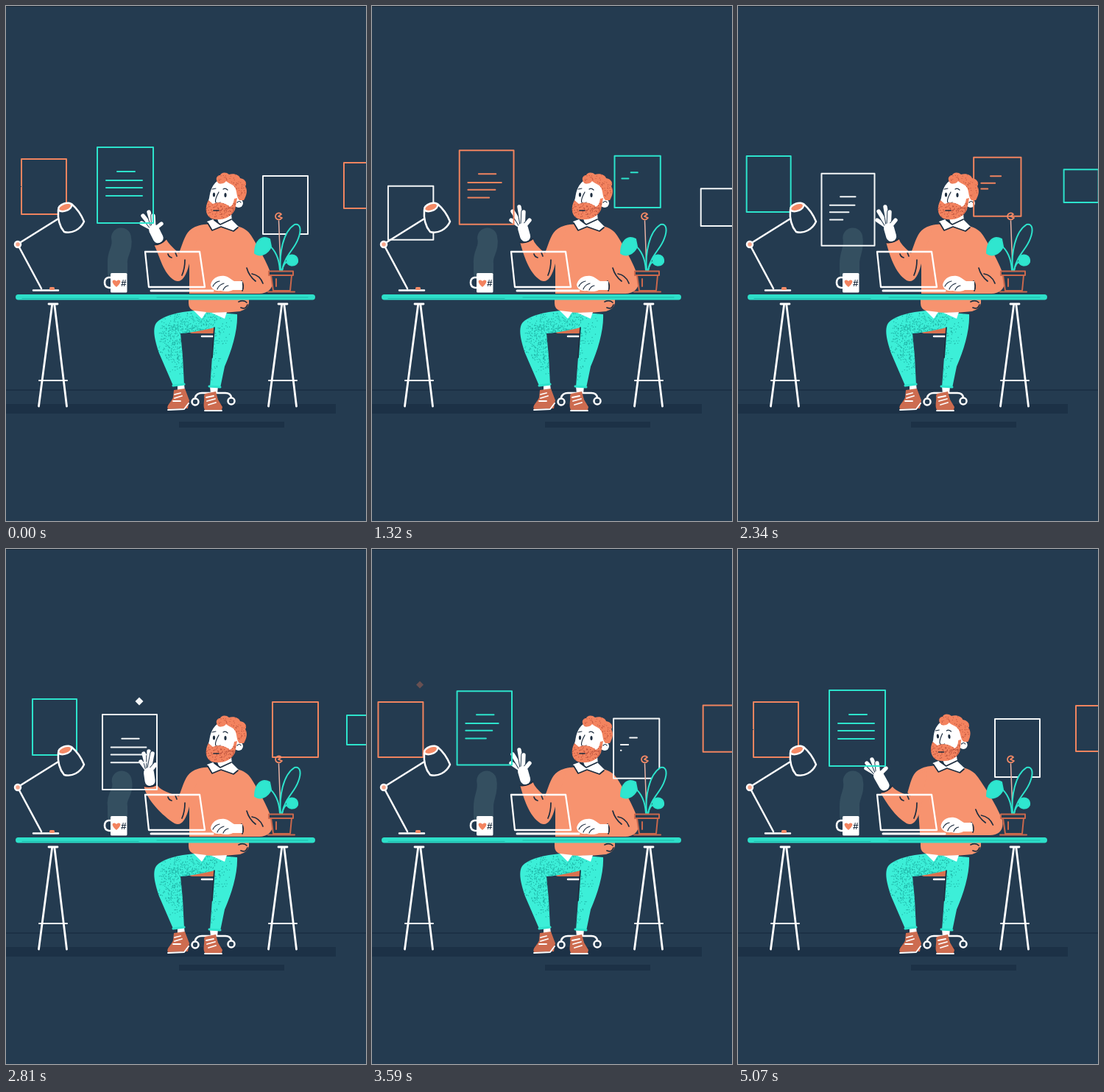
These frames come from a looping animation (489 by 700 pixels, 5150 ms). An HTML page:

```html
<!DOCTYPE html>
<html lang="en">
<head>
<meta charset="utf-8">
<title>Man at a desk swiping panels</title>
<style>
  html, body { margin: 0; width: 100%; height: 100%; overflow: hidden; background: #243b50; }
  svg { display: block; width: 100vw; height: 100vh; }
  .line { fill: none; stroke-linecap: round; stroke-linejoin: round; }
  .white { stroke: #fff; }
  .ink { stroke: #1d2d3f; stroke-width: 1.7; }
  .thin { stroke-width: 1.2; }
  .teal { stroke: #2de3cc; }
  .orange { stroke: #f58a66; }
  .clay { stroke: #c9684d; }
  .skin { fill: #fff; }
  .wool { fill: #f7936f; }
  .hair { fill: #f3835f; }
  .cloth { fill: #3cefd8; }
  .shoe { fill: #cd6c50; }
  .night { fill: #243b50; }
  .shade { fill: #1c3146; }
  .dots { fill: none; stroke-linecap: round; }
  text { font: italic bold 13px "Liberation Sans", sans-serif; fill: #1d2d3f; }
</style>
</head>
<body>
<svg viewBox="0 0 489 700" preserveAspectRatio="none">
  <defs>
    <filter id="rough" filterUnits="userSpaceOnUse" x="0" y="0" width="489" height="700" color-interpolation-filters="sRGB">
      <feTurbulence type="fractalNoise" baseFrequency=".12" seed="4"/>
      <feDisplacementMap in="SourceGraphic" scale="1.5" xChannelSelector="R" yChannelSelector="G"/>
    </filter>
    <path id="hairShape" d="M289 241C284 238 285 230 291 230C292 226 299 225 303 229C310 227 317 230 318 234C325 235 328 241 325 245C329 251 326 259 323 264L317 264C313 260 314 254 312 249C310 242 303 242 299 238C296 242 292 242 289 241Z"/>
    <path id="beardShape" d="M275 264C270 273 270 286 281 289.500C295 292 306 287 311 277L314 261L310 262C309 268 308 271 304 273C298 267 287 266 281 269Z"/>
    <path id="legs" d="M256 414C235 416 212 421 204 431C198 440 203 457 208 472L227 516L242 515L240 476L237 445C250 444 268 441 283 437L277 518L291 519L297 490C307 467 315 440 314 419Z"/>
    <clipPath id="hairClip"><use href="#hairShape"/></clipPath>
    <clipPath id="beardClip"><use href="#beardShape"/></clipPath>
    <clipPath id="legClip"><use href="#legs"/></clipPath>
    <g id="trestle" class="line white" stroke-width="2.800">
      <path d="M58 405H70M62.500 407L44.500 544M66 407L82.500 544"/>
      <path d="M45 509H83" stroke-width="2"/>
    </g>
  </defs>

  <rect class="night" width="489" height="700"/>
  <rect width="489" height="1" fill="#182838"/>

  <g filter="url(#rough)">
    <rect class="shade" y="521" width="489" height="2"/>
    <rect class="shade" x="-5" y="541" width="453" height="13"/>
    <rect class="shade" x="235" y="565" width="143" height="8"/>
  </g>

  <!-- chair -->
  <g class="line white" stroke-width="2.500">
    <path d="M257 532Q259 526 266 526H298Q305 526 306 532"/>
    <circle cx="257" cy="538" r="4.500"/><circle cx="306" cy="537" r="4.500"/>
    <path d="M266 449H281"/>
  </g>
  <rect x="249" y="436" width="36" height="9" rx="4" fill="#d9714f"/>

  <!-- legs and shoes -->
  <path class="skin" d="M233 514H242L243 523H233ZM277 517H288L287 527H278Z"/>
  <use href="#legs" class="cloth"/>
  <path id="legDots" class="dots" clip-path="url(#legClip)" stroke="#1fb3a6" stroke-width="1.300"/>
  <path class="line teal" stroke-width="3" d="M227 516L242 514M276 517L291 518"/>
  <path class="line ink" d="M283 437L280 478"/>
  <path class="shoe" d="M228 522L243 520L249 536L247 547L220 548C217 543 225 538 227 532Z"/>
  <path class="shoe" d="M270 527L285 524L288 535L294 545L293 549H270C267 543 270 537 269 530Z"/>
  <path class="line white" stroke-width="1.800" d="M220 549L242 548L248 540M270 550H293M229 528L237 526M229 533L239 530M227 537L237 537M272 532L282 530M273 537L284 534M275 542L285 539"/>
  <path class="wool" d="M248 396H330V404Q328 412 318 415Q285 419 258 415Q248 413 248 404Z"/>
  <path class="skin" d="M255 414L272 416L266 425ZM279 417L300 416L297 425Z"/>
  <path class="line ink" d="M316 402Q323 399 327 403M319 410Q326 413 328 406"/>

  <!-- steam -->
  <path id="steam" class="line" stroke="#344f60" stroke-width="27"/>

  <g id="torso">
    <path class="wool" d="M252 303C262 296 276 296 291 297C309 297 325 299 333 312C341 325 355 348 362 370C364 384 356 391 344 391H249V350L236 333C241 320 244 308 252 303Z"/>
    <path class="line ink" d="M327 356Q330 367 339 374M334 364Q345 366 349 377M320 374Q324 380 321 387"/>
    <path class="skin" d="M278 379C280 370 288 366 297 367C303 368 306 372 310 374L321 374V386L308 386C303 389 296 388 291 387C285 388 279 385 278 379Z"/>
    <path class="line ink thin" d="M281 381Q284 375 290 374M287 385Q289 379 296 377M295 386Q297 381 302 380"/>
    <path class="skin" d="M285 283L306 281L307 294L290 298Z"/>
    <path class="skin" d="M273 293L281 290L291 297L306 290L316 300L309 306L293 300L280 305Z"/>
    <path class="line ink" d="M283 291L291 297L306 290M274 295L280 305L292 300L309 306L315 301"/>
    <g>
      <path class="skin" d="M287 238C279 244 277 254 276 261L273 271L281 281L308 276L317 260L313 244L298 236Z"/>
      <circle class="skin" cx="316" cy="268" r="6"/>
      <path class="line ink thin" d="M314 267Q317 264 319 267M280 249L285 248M295 249Q298 247 301 250M289 253Q283 264 285 267Q288 269 291 267"/>
      <ellipse cx="282.500" cy="256.500" rx="1.600" ry="3" fill="#1d2d3f"/>
      <ellipse cx="298" cy="257" rx="1.600" ry="3" fill="#1d2d3f"/>
      <use href="#hairShape" class="hair"/><use href="#beardShape" class="hair"/>
      <path id="hairDots" class="dots" clip-path="url(#hairClip)" stroke="#c45941" stroke-width="1.200"/>
      <path id="beardDots" class="dots" clip-path="url(#beardClip)" stroke="#b9523d" stroke-width="1.300"/>
      <path class="line ink" d="M282 278L289 278"/>
    </g>
  </g>
  <path id="sleeve" class="wool"/>
  <path class="line ink" d="M220 337Q221 341 225 342M230 335L232 340M243 345Q243 357 239 366"/>
  <g id="hand"></g>

  <!-- desk -->
  <use href="#trestle"/><use href="#trestle" x="312"/>
  <rect x="13" y="392" width="407" height="7.500" rx="3.700" fill="#2ddfc9"/>
  <path class="line" stroke="#1fb9ac" stroke-width="1.200" d="M22 397.500H180M205 396H410"/>

  <g id="panels" class="line" filter="url(#rough)" stroke-width="2"></g>
  <g id="gems"></g>

  <!-- laptop -->
  <g class="line white" stroke-width="2.300">
    <path d="M189 334H263L270 382H194Z"/><path d="M197 387H281" stroke-width="3"/>
  </g>

  <!-- lamp -->
  <g class="line white" stroke-width="2.500">
    <path d="M48 384L18 328M20 321L76 286M37 386.500H71"/>
    <circle cx="16" cy="324" r="4" fill="#f7a58a"/>
    <path style="fill:#243b50" d="M71 277C70 289 73 300 79 307C89 310 101 304 106 293C102 283 96 275 89 269"/>
    <ellipse cx="80" cy="273.500" rx="9.500" ry="5" transform="rotate(-20 80 273)" style="fill:#f58a66"/>
  </g>
  <rect x="59" y="382" width="7" height="4" rx="1.500" fill="#f58a66"/>

  <!-- mug -->
  <path class="line white" stroke-width="2.600" d="M142 369H139Q134 370 134 376T140 383H143"/>
  <rect class="skin" x="142" y="363" width="22.500" height="26.500" rx="1.500"/>
  <path fill="#f3835f" d="M150 382C141 375 145 370 150 374C155 370 159 375 150 382Z"/>
  <text x="156" y="381">#</text>

  <!-- plant -->
  <path class="line" stroke="#e9b3a5" stroke-width="1.500" d="M370.500 292L373 358"/>
  <path class="line orange" stroke-width="1.800" d="M374 283A4.500 4.500 0 1 0 374.500 288M374 283L370 286L375 288"/>
  <g class="line teal" stroke-width="2">
    <path style="fill:#243b50" d="M373 359C371 337 376 307 392 297C401 295 401 306 397 316C392 331 379 338 375 359"/>
    <path d="M357 325C366 332 371 343 372 359M387 345C379 347 376 352 375 360"/>
    <path style="fill:#2fe6cf" d="M358 317C347 311 338 320 338 336C344 341 355 338 360 327Z"/>
    <path style="fill:#2fe6cf" d="M382 341C388 336 397 339 396 348C393 354 385 354 382 349Z"/>
  </g>
  <g class="line clay" stroke-width="2">
    <path style="fill:#243b50" d="M360 366H388L386 387H363Z"/>
    <path style="fill:#243b50" d="M357 360.500H390V366H357Z"/>
    <path d="M356 388.500H392M367 371V381"/>
  </g>
</svg>

<script>
const LOOP = 5150, STEPS = 66, STEP = LOOP / STEPS;
const TEAL = '#2de3cc', ORANGE = '#f0845f', WHITE = '#f4f7f8';
const NS = 'http://www.w3.org/2000/svg';
const $ = id => document.getElementById(id);
const clamp = v => Math.max(0, Math.min(1, v));
const lerp = (a, b, p) => a + (b - a) * p;
const mix = (a, b, p) => a.map((v, i) => lerp(v, b[i], p));
const inOut = p => p < .5 ? 4 * p ** 3 : 1 - 4 * (1 - p) ** 3;
const smooth = p => p * p * (3 - 2 * p);

function add(parent, tag, attrs) {
  const el = document.createElementNS(NS, tag);
  for (const k in attrs) el.setAttribute(k, attrs[k]);
  return parent.appendChild(el);
}

// keys: [time, values]
function sample(keys, t) {
  const i = keys.findIndex(k => k[0] > t);
  if (i < 0) return keys[keys.length - 1][1];
  if (!i) return keys[0][1];
  const [a, va] = keys[i - 1], [b, vb] = keys[i];
  return mix(va, vb, smooth((t - a) / (b - a)));
}

function random(seed) {
  return () => (seed = seed * 16807 % 2147483647) / 2147483647;
}

// Seeded specks in a box, thinned by a density function
function specks(id, seed, count, [x, y, w, h], density = () => 1) {
  const rnd = random(seed);
  let d = '';
  while (count--) {
    const px = x + rnd() * w, py = y + rnd() * h;
    if (rnd() < density(px, py)) d += `M${px.toFixed(1)} ${py.toFixed(1)}h.1`;
  }
  $(id).setAttribute('d', d);
}
specks('hairDots', 71, 170, [283, 225, 45, 41]);
specks('beardDots', 93, 190, [270, 260, 45, 33]);
specks('legDots', 37, 3000, [199, 413, 118, 105], (x, y) =>
  x > 268 ? clamp((300 - x) / 40 + (465 - y) / 130) * .7
          : clamp((y - 412) / 25) * clamp((510 - y) / 60) * clamp((x - 203) / 28));

// Panels: colour, state in which the panel is in the middle, place in each state
const swipes = [800, 1870, 3070], SWIPE = 730;
const right = [349, 231, 61, 79], left = [21, 208, 61, 75], middle = [124, 192, 76, 103];
const edge = [459, 213, 50, 62], out = [535, 235, 30, 30];
const panels = [
  [TEAL, 0, [middle, [349, 205, 61, 67], [463, 226, 44, 40], out]],
  [ORANGE, 1, [left, [128, 195, 75, 103], [362, 208, 62, 75], edge]],
  [WHITE, 2, [[-95, 284, 45, 10], [33, 241, 63, 79], [131, 225, 74, 102], right]],
  [TEAL, 3, [out, [-100, 204, 60, 76], [36, 204, 60, 76], middle]],
  [ORANGE, 9, [out, out, [-110, 208, 61, 75], left]],
  [WHITE, 9, [right, [456, 250, 45, 48], out, out]],
  [ORANGE, 9, [edge, out, out, out]]
].map(([stroke, mid, slots]) => ({ mid, slots, el: add($('panels'), 'path', { stroke }) }));
const rows = [[27, 33, 24], [12, 45, 49], [12, 55, 49], [12, 66, 49]];

function swipeState(t) {
  let state = 0;
  for (const start of swipes) {
    if (t < start) break;
    const p = (t - start) / SWIPE;
    if (p < 1) return [state, p];
    state++;
  }
  return [state, 0];
}

function rowLength(i, mid, state, p) {
  if (state === mid) return p ? clamp(.5 - .24 * i - (p - .71) * 3) : 1;
  if (state + 1 === mid && p) return clamp(1.095 - .175 * i + (p - .71) * 3);
  return 0;
}

function drawPanels(t) {
  const [state, p] = swipeState(t);
  for (const { mid, slots, el } of panels) {
    const from = slots[state], to = slots[Math.min(3, state + 1)];
    // panels parked outside jump to their entry side while unseen
    const [x, y, w, h] = from === out || !p ? from : mix(from, to, inOut(p));
    let d = `M${x} ${y}h${w}v${h}h${-w}z`;
    rows.forEach(([rx, ry, len], i) => {
      const k = rowLength(i, mid, state, p);
      if (k) d += `M${x + rx * w / 76} ${y + ry * h / 103}h${len * k * w / 76}`;
    });
    el.setAttribute('d', d);
  }
}

// Hand poses: wrist, palm, four fingertips, thumb tip
const wave = [208, 318, 201, 304, 184, 295, 186, 285, 194, 280, 200, 285, 211, 296];
const flick = [209, 316, 205, 302, 189, 291, 191, 279, 200, 273, 206, 280, 214, 291];
const reach = [195, 315, 184, 303, 160, 304, 161, 292, 169, 283, 177, 285, 190, 288];
const push = [196, 318, 194, 304, 183, 289, 187, 278, 194, 275, 199, 278, 203, 293];
const hold = [200, 324, 191, 308, 174, 298, 175, 291, 182, 286, 189, 291, 201, 298];
const handKeys = [
  [0, wave], [480, wave], [870, reach], [1260, flick], [1420, flick], [1930, reach], [2010, reach],
  [2340, flick], [2480, flick], [2810, push], [3140, reach], [3520, flick], [3650, flick],
  [4150, hold], [5080, hold], [LOOP, wave]
];
const leanKeys = [[3650, [0]], [4150, [1]], [5080, [1]], [LOOP, [0]]];

const fingers = Array.from({ length: 5 }, () => ['#243b50', 'white'].map((stroke, i) =>
  add($('hand'), 'path', { class: 'line', stroke, 'stroke-width': i ? 5.4 : 7.4 })));
const palm = add($('hand'), 'path', { class: 'line', stroke: 'white', 'stroke-width': 14 });
const cuff = add($('hand'), 'path', { class: 'line ink' });

function drawArm(t, lean) {
  const [wx, wy, px, py, ...tips] = sample(handKeys, t);
  const len = Math.hypot(wx - px, wy - py), dx = (wx - px) / len, dy = (wy - py) / len;
  fingers.forEach((pair, i) => pair.forEach(el =>
    el.setAttribute('d', `M${px} ${py}L${tips[2 * i]} ${tips[2 * i + 1]}`)));
  palm.setAttribute('d', `M${px} ${py}L${wx - dx * 3} ${wy - dy * 3}`);

  const cx = wx + dx * 3, cy = wy + dy * 3;
  const lx = cx - dy * 9, ly = cy + dx * 9, rx = cx + dy * 9, ry = cy - dx * 9;
  cuff.setAttribute('d', `M${lx} ${ly}Q${cx + dx * 4} ${cy + dy * 4} ${rx} ${ry}`);
  const s = -7 * lean;
  $('sleeve').setAttribute('d', `M${lx} ${ly}C${lx + dx * 18} ${ly + dy * 18} 213 363 229 373` +
    `Q242 379 249 350L${264 + s} 302C${249 + s} 302 ${244 + s} 318 235 336` +
    `Q${rx + dx * 8} ${ry + dy * 8} ${rx} ${ry}Q${cx + dx * 4} ${cy + dy * 4} ${lx} ${ly}Z`);
}

// Sparks: x, y, colour, start, end, size, outlined
const gems = [
  [433, 222, TEAL, 1740, 2140, 4.5],
  [181, 207, WHITE, 2620, 3000, 5.5],
  [65, 184.5, '#c96f56', 3480, 4720, 5],
  [221, 264, TEAL, 4020, 4390, 6.5, true]
].map(([x, y, color, from, to, r, hollow]) => ({
  from, to,
  el: add($('gems'), 'path', {
    d: `M${x} ${y - r}l${r} ${r}l${-r} ${r}l${-r} ${-r}z`,
    fill: hollow ? 'none' : color, stroke: hollow ? color : 'none', 'stroke-width': 1.6
  })
}));

function draw(t) {
  const [lean] = sample(leanKeys, t), skew = .07 * lean;
  $('torso').setAttribute('transform', `matrix(1 0 ${skew} 1 ${-skew * 415} ${-2 * lean})`);
  drawPanels(t);
  drawArm(t, lean);
  for (const { from, to, el } of gems) {
    const p = clamp((t - from) / (to - from));
    el.setAttribute('opacity', clamp(Math.sin(p * Math.PI) * 1.5));
  }
  const sway = Math.sin(t / LOOP * Math.PI * 8) * 1.5;
  $('steam').setAttribute('d', `M${156.5 + sway / 2} 315C${160 + sway} 330 ${150 - sway} 336 151.500 350V362`);
}

let last = -1;
function tick() {
  const step = Math.floor((performance.now() % LOOP + 18) / STEP) % STEPS;
  if (step !== last) draw((last = step) * STEP);
  requestAnimationFrame(tick);
}
tick();
</script>
</body>
</html>
```
